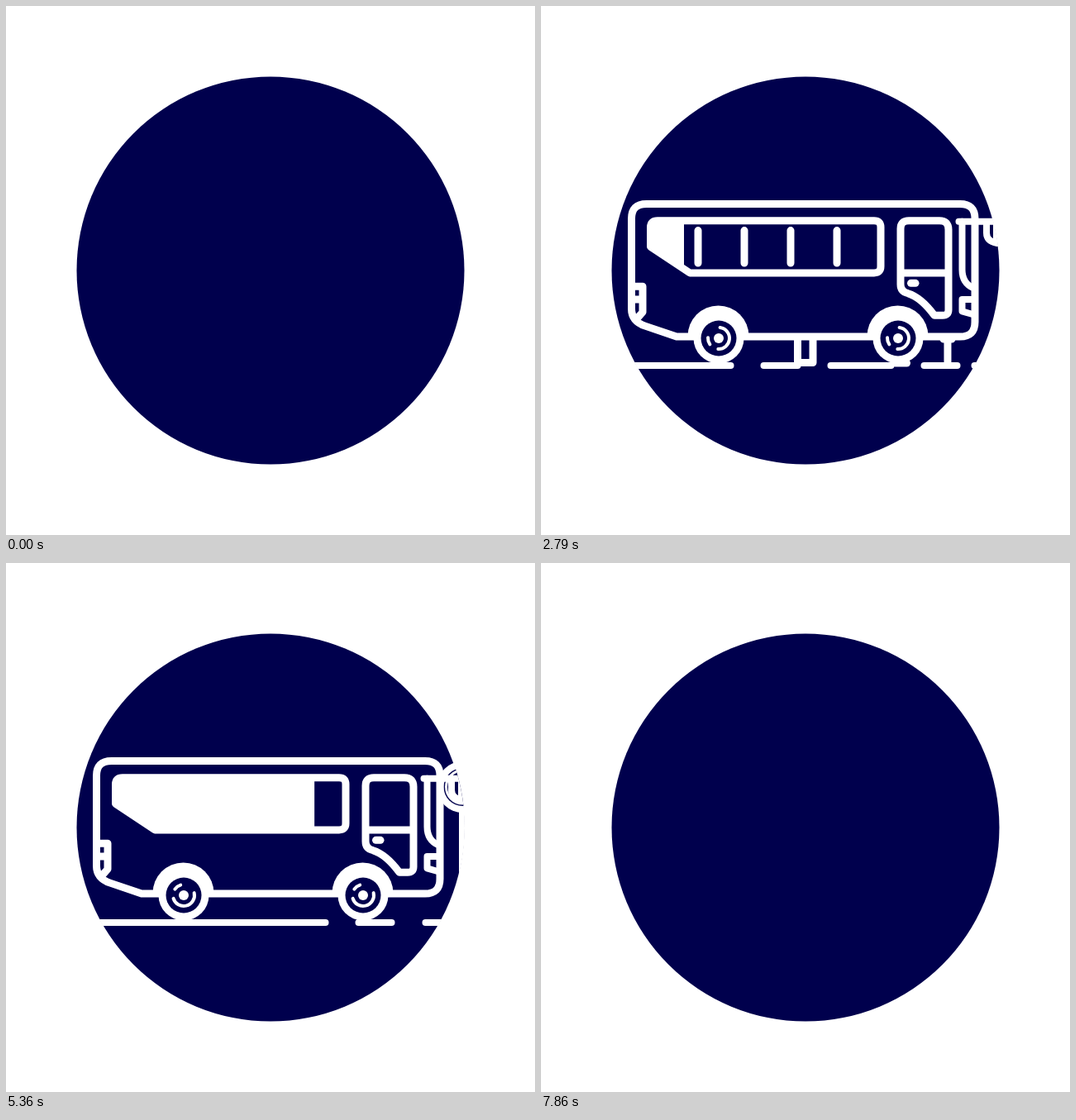
An HTML page with a canvas for the animation above (8.5 s loop, 640 by 640 pixels).

```html
<!DOCTYPE html>
<html>
<head>
<meta charset="utf-8">
<style>
html, body { margin: 0; width: 100%; height: 100%; overflow: hidden; background: #fff; }
canvas { display: block; width: 640px; height: 640px; }
</style>
</head>
<body>
<canvas id="stage" width="640" height="640"></canvas>
<script>
const c = document.getElementById('stage').getContext('2d');
const NAVY = '#00004d', WHITE = '#fff', LOOP = 8500, FRAME = LOOP / 119;
const RAD = Math.PI / 180;

function disc(x, y, r, color) {
  c.fillStyle = color;
  c.beginPath();
  c.arc(x, y, r, 0, 7);
  c.fill();
}

function stroke(d, width = 9, fill) {
  const p = new Path2D(d);
  if (fill) { c.fillStyle = fill; c.fill(p); }
  c.strokeStyle = WHITE;
  c.lineWidth = width;
  c.stroke(p);
}

function arc(x, y, r, from, to, width) {
  c.lineWidth = width;
  c.strokeStyle = WHITE;
  c.beginPath();
  c.arc(x, y, r, from * RAD, to * RAD);
  c.stroke();
}

// Crown lobes are [y, outer radius]; together they form one outline.
function crown(x, lobes) {
  for (const [y, r] of lobes) disc(x, y, r, WHITE);
  for (const [y, r] of lobes) disc(x, y, r - 9, NAVY);
}

function trees(x) {
  crown(x, [[254, 34.5], [298, 43.5], [343, 48.5]]);
  c.save();
  c.translate(x, 0);
  stroke('M0 287V432M0 321L-18 304M0 357L27 334');
  c.restore();
  crown(x + 68, [[362, 21], [380, 26]]);
  stroke(`M${x + 68} 374V432`);
}

// Ground dashes [start, end], measured at frame 50.
const dashes = [
  [-722, -589], [-557, -509], [-476, -428], [-396, -348],
  [-312, -179], [-147, -98], [-66, 15], [47, 95],
  [108, 229], [261, 309], [342, 390],
  [507, 640], [672, 720], [753, 801], [834, 967],
  [1000, 1328], [1360, 1408], [1441, 1489], [1522, 1570], [1602, 1650],
  [1677, 1725], [1757, 1890]
];

function scenery(f) {
  c.save();
  c.translate(-37.5 * (f - 50), 0);
  for (const [a, b] of dashes) stroke(`M${a + 4} 435H${b - 4}`, 8);
  stroke('M-102 380V431.5H-83.5V380');
  stroke('M16 432H30');
  stroke('M1490 300V432');
  disc(1490, 271, 31, WHITE);
  disc(1490, 271, 23, NAVY);
  arc(1490, 271, 20, 0, 360, 3);
  trees(1663);
  c.restore();

  const pole = 93 - 36.27 * (f - 50);
  stroke(`M${pole} 242V432M${pole - 5} 403H${pole + 5}`);
}

const windowPane = 'M141 258H403Q411 258 411 266V314Q411 322 403 322H180L132.5 290V266Q132.5 258 141 258Z';

function body(f) {
  stroke('M127.5 237.5H507Q525 237.5 525 255.5V382Q525 400 507 400H164L126 387Q109.5 381 109.5 366V255.5Q109.5 237.5 127.5 237.5Z', 9, NAVY);
  stroke('M110 338.5H123V370L116 378M110 354.5H123');
  stroke('M190 270V310M246 270V310M302 270V310M358 270V310');
  stroke(windowPane);
  const edge = 173 + 5.56 * (f - 39);
  if (edge > 128) {
    c.save();
    c.beginPath();
    c.rect(120, 240, edge - 120, 100);
    c.clip();
    c.fillStyle = WHITE;
    c.fill(new Path2D(windowPane));
    c.restore();
  }
  stroke('M435 268Q435 258 445 258H482Q493 258 493 269V367Q493 374 486 374H476Q460 352 444 347Q435 345 435 336ZM435 322H493');
  stroke('M447.5 334.5H453', 9);
  stroke('M509.5 259V318Q509.5 335 524 341', 8);
  stroke('M505.5 259H560M539 259V273Q539 283 551 285.5V259', 8);
  stroke('M525 354.5H509.5V369L523 373', 8);
}

// Angle of the long hub arc as [frame, degrees].
const turns = [[0, -1344], [19, 190], [39, 1805], [50, 2580], [75, 4395], [91, 5630], [119, 7790]];

function spin(f) {
  const i = Math.max(1, turns.findIndex(k => k[0] >= f));
  const [f0, a0] = turns[i - 1], [f1, a1] = turns[i];
  return a0 + (a1 - a0) * (f - f0) / (f1 - f0);
}

function wheel(x, angle) {
  c.fillStyle = WHITE;
  c.beginPath();
  c.arc(x - .5, 399.5, 37, Math.PI, 0);
  c.lineTo(x + 36, 404);
  c.lineTo(x - 36, 404);
  c.fill();
  disc(x, 402, 30.5, WHITE);
  disc(x, 402, 21.5, NAVY);
  disc(x, 402, 6, WHITE);
  arc(x, 402, 13, angle - 88, angle + 88, 4);
  arc(x, 402, 13, angle + 140, angle + 178, 4);
}

function busOffset(t) {
  if (t < 1320) return -480 * (1 - Math.max(0, (t - 690) / 630)) ** 3;
  const u = Math.max(0, (t - 6544) / 1313);
  return 500 * (2 * u ** 3 - u * u);
}

function bus(f, t) {
  const bounce = 1 - Math.cos((f - 19) / 4.5 * 2 * Math.PI);
  c.save();
  c.translate(busOffset(t), 0);
  c.save();
  c.translate(0, 400);
  c.scale(1, 1 - bounce / 162);
  c.translate(0, -400);
  body(f);
  c.restore();
  const angle = spin(f);
  wheel(215, angle);
  wheel(432, angle);
  c.restore();
}

function draw(now) {
  const f = Math.floor((now % LOOP + 6) / FRAME) % 119;
  c.fillStyle = WHITE;
  c.fillRect(0, 0, 640, 640);
  c.lineCap = c.lineJoin = 'round';
  disc(320, 320, 234.5, NAVY);
  if (f >= 10 && f < 110) {
    c.save();
    c.beginPath();
    c.arc(320, 320, 235, 0, 7);
    c.clip();
    scenery(f);
    bus(f, f * FRAME);
    c.restore();
    trees(353 - 30 * (f - 50));
  }
}

const start = performance.now();
function tick() {
  draw(performance.now() - start);
  requestAnimationFrame(tick);
}
tick();
</script>
</body>
</html>
```
